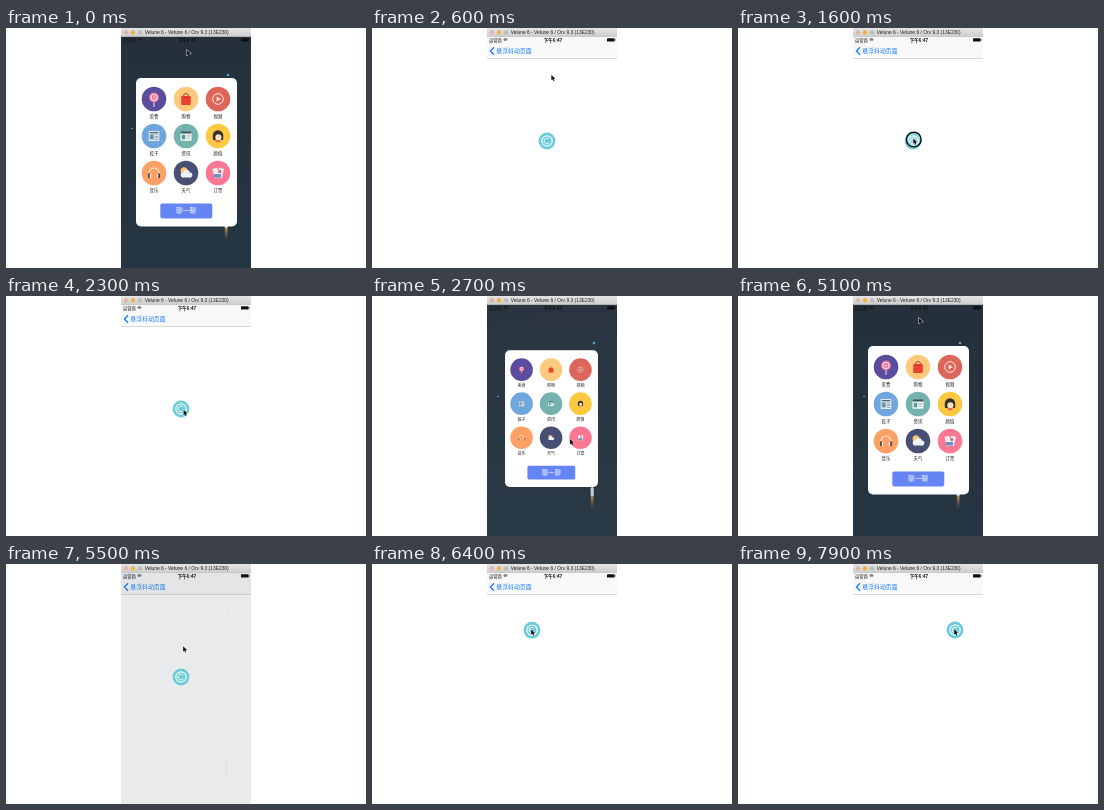
Recreate the animation shown at these times as an HTML page with a canvas. Size 360 by 240 pixels, loop 8 s.

```html
<!DOCTYPE html>
<html lang="zh">
<head>
<meta charset="utf-8">
<style>
html, body { margin: 0; width: 360px; height: 240px; overflow: hidden; background: #fff; }
canvas { display: block; width: 360px; height: 240px; }
</style>
</head>
<body>
<canvas id="stage"></canvas>
<script>
const canvas = document.getElementById('stage');
const c = canvas.getContext('2d');
const ratio = window.devicePixelRatio || 1;
canvas.width = 360 * ratio;
canvas.height = 240 * ratio;

const LOOP = 8000, STEP = 100, TAU = Math.PI * 2;
const OPEN = 2300, CLOSES = [150, 5150], DRAG = 6000;
const CJK = '"Noto Sans CJK SC", "Noto Sans CJK", sans-serif';
const LATIN = '"Liberation Sans", sans-serif';

const ease = p => p < .5 ? 2 * p * p : 1 - 2 * (1 - p) ** 2;
const span = (t, from, length) => ease(Math.min(1, Math.max(0, (t - from) / length)));
const mix = (a, b, p) => a.map((v, i) => v + (b[i] - v) * p);

const rest = [175, 113], press = [175.3, 110.5], home = [181, 22];

function ballAt(t) {
  const lifted = mix(rest, [160, 66], span(t, DRAG, 300));
  const sway = 4 * Math.sin(span(t, DRAG + 300, 1600) * TAU);
  return mix(lifted, [217, 66], span(t, DRAG + 500, 1400)).map((v, i) => v + i * sway);
}
function cursorAt(t) {
  if (t >= DRAG) return mix(ballAt(t), [0, 0], 0).map(v => v - .8);
  const hover = mix([198, 143], [196, 118], span(t, 2650, 1500));
  let spot = mix(home, press, span(t, 300, 800));
  spot = mix(spot, hover, span(t, 2200, 450));
  spot = mix(spot, home, span(t, 4150, 600));
  return mix(spot, press, span(t, 5150, 583));
}

function box(x, y, w, h, color, r = 0) {
  c.fillStyle = color;
  c.beginPath();
  c.roundRect(x, y, w, h, r);
  c.fill();
}
function disc(x, y, r, color) {
  c.fillStyle = color;
  c.beginPath();
  c.arc(x, y, r, 0, TAU);
  c.fill();
}
function arc(x, y, r, color, width, from = 0, to = TAU) {
  c.strokeStyle = color;
  c.lineWidth = width;
  c.beginPath();
  c.arc(x, y, r, from, to);
  c.stroke();
}
function triangle(r, color) {
  c.fillStyle = color;
  c.beginPath();
  for (let a = 0; a < TAU - .1; a += TAU / 3) c.lineTo(r * Math.cos(a), r * Math.sin(a));
  c.fill();
}
function fade(y, h, from, to) {
  const gradient = c.createLinearGradient(0, y, 0, y + h);
  gradient.addColorStop(0, from);
  gradient.addColorStop(1, to);
  return gradient;
}
function label(text, x, y, size, color, align = 'center', family = CJK, weight = 400) {
  c.font = `${weight} ${size}px ${family}`;
  c.textAlign = align;
  c.fillStyle = color;
  c.fillText(text, x, y);
}
function placed(x, y, scale, angle, draw) {
  c.save();
  c.translate(x, y);
  c.scale(scale, scale);
  c.rotate(angle);
  draw();
  c.restore();
}
// Evenly spaced text lines inside an icon.
function lines(x, y, w, count, color) {
  for (let i = 0; i < count; i++) box(x, y + i * 1.5, w, .6, color);
}

function candy() {
  box(-.5, 2, 1, 6, '#f4e3ea', .5);
  for (let i = 0; i < 4; i++) disc(0, -1.5, 5 - i * 1.3, i % 2 ? '#fbd3df' : '#ea6a9c');
}
function bag() {
  arc(0, -3, 2.5, '#a8322b', .9, Math.PI, TAU);
  box(-4.8, -3, 9.6, 9, '#e9422f', .8);
  box(-2.6, -1.8, 5.2, .8, '#b92d23');
}
function play() {
  arc(0, 0, 5.3, '#fbe9e3', 1);
  triangle(2.8, '#fbe9e3');
}
function paper() {
  box(-5.3, -5, 10.6, 10, '#e5edf2', .5);
  box(-4.3, -4, 8.6, 1.3, '#53677b');
  box(-4.3, -1.6, 4, 5, '#6f91ad');
  lines(.6, -1.5, 3.7, 4, '#728397');
}
function page() {
  box(-5.5, -4.7, 11, 9.4, '#f1f5f2', .7);
  box(-5.5, -4.7, 11, 2.2, '#395b66', .7);
  box(-4.2, -1.2, 3.4, 4.5, '#4f9b9b');
  lines(.4, -1, 3.7, 3, '#9babad');
}
function face() {
  disc(0, -.5, 5.2, '#32302f');
  box(-5.2, -.5, 10.4, 4.5, '#32302f', 1);
  disc(.4, 1.4, 3.1, '#f9dfbd');
  box(-2.5, 4.2, 5, 2, '#e9655b', 1);
}
function headphones() {
  arc(0, 0, 5, '#fff0dc', 1.1, Math.PI, TAU);
  for (const side of [-1, 1]) {
    box(side * 4.8 - 1.2, .2, 2.4, 5, '#59484b', 1);
    box(side * 3.5 - .7, .5, 1.4, 4.4, '#ffe5c6', .5);
  }
}
function weather() {
  disc(-2, -2.2, 3.5, '#f8c471');
  for (let i = -1; i <= 1; i++) disc(.5 + i * 3.5, 2 - 1.5 * (1 - i * i), 3.4 - i * i, '#edf2f7');
  box(-4, 2, 9, 2.6, '#edf2f7', 1.2);
}
function ticket() {
  placed(-2, 0, 1, -.25, () => box(-2.5, -5, 5, 10, '#f7edf0', .5));
  placed(2.5, 0, 1, .25, () => box(-2.5, -5, 5, 10, '#e6edf5', .5));
  box(-4, 1, 7, 3.6, '#6d8fc2', .7);
  disc(1.8, -1.3, 1.4, '#df4767');
}

const items = [
  ['美食', '#5b4c9e', candy], ['购物', '#fdc97d', bag], ['视频', '#dc665a', play],
  ['段子', '#6fa6dd', paper], ['资讯', '#74b3ad', page], ['颜值', '#fcc940', face],
  ['音乐', '#fca066', headphones], ['天气', '#474f74', weather], ['订票', '#fb7794', ticket]
];

function titleBar() {
  box(115, 0, 130, 8.5, fade(0, 8, '#e6e5e5', '#d0cfcf'));
  box(115, 8, 130, .5, '#b4b2b2');
  ['#dfb5a8', '#f1b13d', '#bebcba'].forEach((color, i) => disc(120 + 7 * i, 4.4, 2.2, color));
  label('Velune 6 - Velune 6 / Orv 9.3 (13E230)', 180.7, 6, 4.9, '#222', 'center', LATIN);
}
function navBar() {
  box(115, 8, 130, 22.5, '#f8f8f8');
  box(115, 30.2, 130, .5, '#b8b8ba');
  c.strokeStyle = '#147efb';
  c.lineWidth = 1.3;
  c.beginPath();
  for (let i = -1; i <= 1; i++) c.lineTo(118.4 + 3.6 * Math.abs(i), 23 + 3.8 * i);
  c.stroke();
  label('悬浮抖动页面', 124.3, 25.2, 5.9, '#147efb', 'left', CJK, 500);
}
function statusBar() {
  label('运营商', 117, 13.6, 4.3, '#111', 'left', CJK, 500);
  for (const r of [1.4, 2.7]) arc(133.5, 13.5, r, '#111', .8, 3.9, 5.5);
  label('下午6:47', 181, 13.6, 4.5, '#111', 'center', CJK, 700);
  box(235, 10.2, 7.6, 3.4, '#111', .6);
  box(242.9, 11.2, .6, 1.4, '#111');
}

function sky(alpha) {
  c.save();
  c.globalAlpha = alpha;
  box(115, 8.5, 130, 231.5, fade(8, 232, '#25303c', '#243541'));
  const stars = [[222, 47], [126, 100.5], [134, 99], [225.5, 99], [158, 70]];
  stars.forEach(([x, y], i) => disc(x, y, i ? .8 : 1.3, i ? '#86abb8' : '#4aa9cf'));
  box(218.8, 199, 2.8, 16, fade(199, 16, '#c79a61', 'rgba(90,70,55,0)'));
  box(218.6, 191, 3.2, 9, '#c9d3d6', 1.6);
  c.restore();
}

function ball(x, y) {
  disc(x, y, 8.4, '#6ccbd9');
  arc(x, y, 5.2, '#f0fbfc', 1.2);
  arc(x, y, 2.9, '#f0fbfc', 1, .5, 5.6);
}

function panel(scale, t) {
  const active = t >= OPEN;
  const growth = active ? .5 + .5 * span(t, OPEN, 2000) : 1;
  const shake = span(t, 2700, 900) * (1 - span(t, 3900, 400));
  const tilt = active ? shake * .7 * Math.cos((t - 3600) / 110) : 0;
  const spin = active ? TAU * span(t, 2870, 1480) : 0;
  const [ax, ay] = [168, 104];
  c.save();
  c.translate(ax, ay);
  c.scale(scale, scale);
  c.translate(-ax, -ay);
  box(130, 50, 101, 148.5, '#fff', 5);
  items.forEach(([name, color, draw], i) => {
    const x = 148 + 32 * (i % 3), y = 71 + 37 * Math.floor(i / 3);
    disc(x, y, 12.3, color);
    placed(x, y, growth, tilt, draw);
    label(name, x, y + 19.2, 4.4, '#222');
  });
  placed(180.3, 183, 1, spin, () => {
    box(-26, -7.4, 52, 14.8, '#6585f5', 1.8);
    label('聊一聊', 0, 2.4, 6.8, '#fff', 'center', CJK, 500);
  });
  c.restore();
}

function cursor(x, y) {
  placed(x, y, 1, 1.17, () => {
    c.strokeStyle = '#f5f5f5';
    c.lineWidth = .9;
    c.beginPath();
    for (const side of [-.4, 0, .4]) {
      const reach = side ? 5.2 : 0;
      c.lineTo(reach * Math.cos(side), reach * Math.sin(side));
    }
    c.closePath();
    c.stroke();
    c.fillStyle = '#111';
    c.fill();
    box(4, -.5, 2.6, 1, '#111');
  });
}

function clickRing() {
  disc(175.8, 111.5, 7.2, 'rgba(235,250,253,.3)');
  arc(175.8, 111.5, 7.3, '#111', 1.5);
}

function render(t) {
  c.setTransform(ratio, 0, 0, ratio, 0, 0);
  box(0, 0, 360, 240, '#fff');
  c.save();
  c.beginPath();
  c.rect(115, 0, 130, 240);
  c.clip();
  navBar();
  const first = t < OPEN;
  const closeAt = CLOSES[first ? 0 : 1];
  const shown = (rise, fall) => (first ? 1 : span(t, OPEN, rise)) * (1 - span(t, closeAt, fall));
  const shade = shown(450, 450), size = shown(500, 320);
  if (shade > 0) sky(shade);
  if (shade < .9) ball(...ballAt(t));
  if (size > 0) panel(size, t);
  statusBar();
  titleBar();
  if (t >= 1500 && t < 1800) clickRing();
  cursor(...cursorAt(t));
  c.restore();
}

const start = performance.now();
function tick() {
  const t = (performance.now() - start) % LOOP;
  render(Math.floor(t / STEP) * STEP);
  requestAnimationFrame(tick);
}
tick();
</script>
</body>
</html>
```
